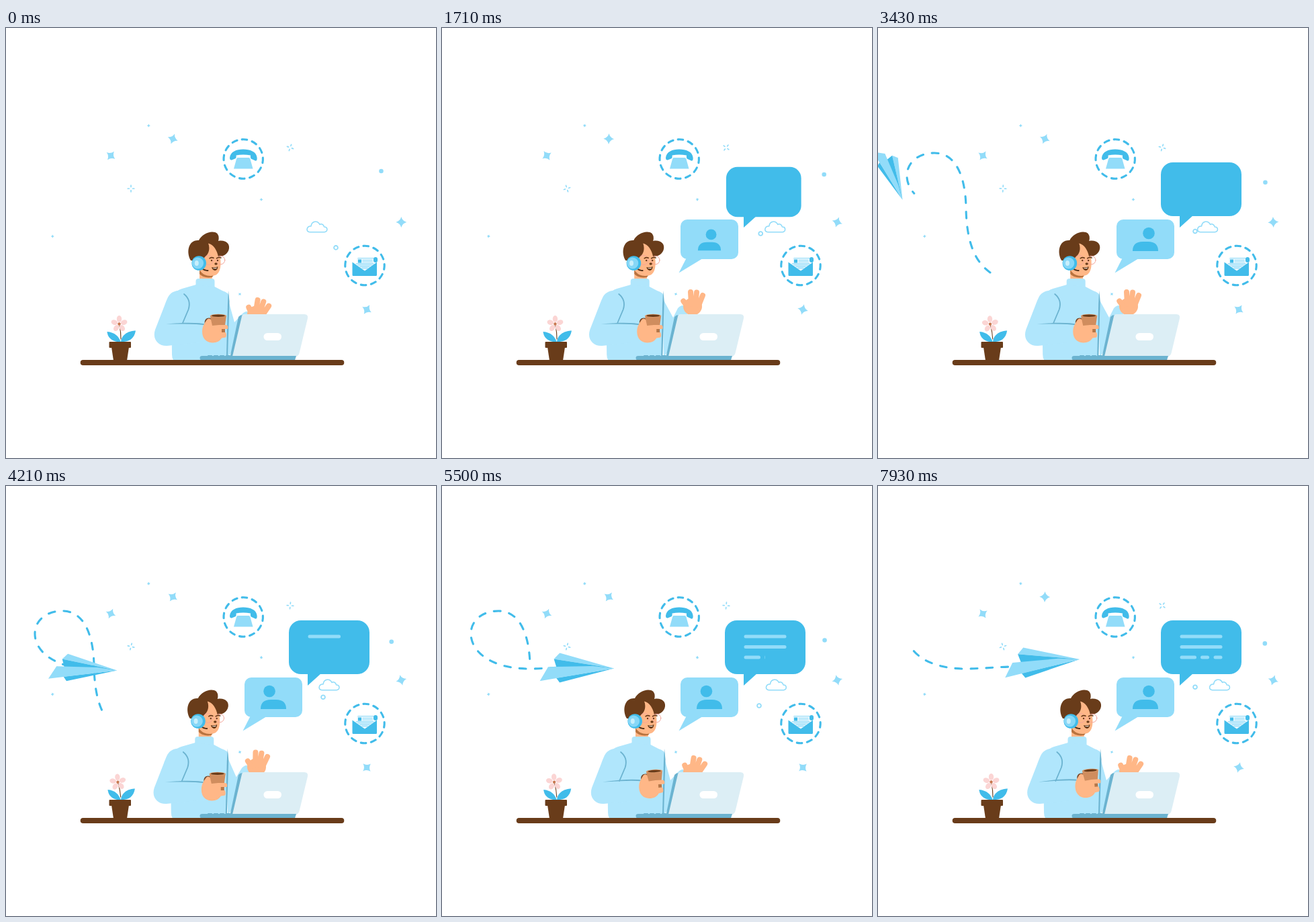
An HTML page that plays this animation: 640 px wide and 640 px high, repeating every 8000 ms.

```html
<!DOCTYPE html>
<html lang="en">
<head>
<meta charset="utf-8">
<title>Customer support</title>
<style>
html, body { margin: 0; height: 100%; overflow: hidden; background: #fff; }
svg { display: block; width: 100vw; height: 100vh; }
.blue { fill: #41bcea; }
.light { fill: #92dcf9; }
.brown { fill: #693c1a; }
.skin { fill: #ffb787; }
.cloth { fill: #b0e6fc; }
.shade { fill: #6bb3d0; }
.line { fill: none; stroke-linecap: round; stroke-linejoin: round; }
.dashed { fill: none; stroke: #41bcea; stroke-width: 3.1; stroke-linecap: round; }
.badge { stroke-dasharray: 7.6 7.7; }
</style>
</head>
<body>
<svg viewBox="0 0 640 640">
  <g id="sparkles"></g>
  <circle id="dot" class="light" r="3.3"/>
  <circle id="ring" class="line" r="2.9" stroke="#92dcf9" stroke-width="1.8"/>

  <!-- phone -->
  <circle class="dashed badge" cx="353.2" cy="195" r="29.2" transform="rotate(-94 353.2 195)"/>
  <path class="light" d="M345 193H361Q363 193 363.5 195L367.5 209.5H339L343 195Q343.5 193 345 193Z"/>
  <path class="blue" d="M333 193C334 184 343 180.5 353 180.5S373 184 373.6 193Q374 198.5 371 197.5L364.5 194.5Q363.5 192 364 189.5Q353 187.5 342.6 189.5Q343 192 342 194L336 196.5Q333 197 333 193Z"/>

  <!-- mail -->
  <circle class="dashed badge" cx="534" cy="353.5" r="29.2" transform="rotate(-94 534 353.5)"/>
  <path fill="#e6f6fd" d="M522.5 342.5H547V353L534 361.5L522.5 353Z"/>
  <path class="line" stroke="#92dcf9" stroke-width="1.2" d="M524 342.5H547M531 345.5H545M531 348H545M521 350.8H547M524 353H544M527 355.2H541M530 357.4H538"/>
  <rect class="blue" x="524" y="344.5" width="5" height="5"/>
  <rect class="blue" x="547" y="341" width="6" height="8" rx="3"/>
  <path class="blue" d="M515.5 348.5L534 361.5L552 348.5V367.5Q552 369 550.5 369H517Q515.5 369 515.5 367.5Z"/>

  <!-- paper plane, its trail and its route -->
  <path id="trail" class="dashed" d="M167 364C140 345 132 310 131 270C131 235 122 186 84 186C60 186 43 200 43 220C43 245 71 272 130 272C155 272 180 269 200 269"/>
  <path id="route" fill="none" d="M167 364C140 345 131 310 131 270C131 235 115 182 75 182C30 182 8 186 22 218C32 241 70 269.6 111 271C150 272.4 200 270 252 270"/>
  <g id="plane">
    <path class="light" d="M56 2L-26 -23L-35 -14Z"/>
    <path class="blue" d="M56 2L-35 -14L-31 0Z"/>
    <path class="blue" d="M56 2L-32 15L-27 22Z"/>
    <path class="light" d="M56 2L24 -2L-44 -2L-57 19Z"/>
  </g>

  <!-- flower pot -->
  <g id="flower">
    <path class="line" stroke="#693c1a" stroke-width="1.1" d="M171 463Q171 452 169 443"/>
    <g id="petals" fill="#fbd5d4"></g>
    <circle cx="168.5" cy="440.5" r="2.2" fill="#c9774f"/>
  </g>
  <path id="leaves" class="blue" d="M171 467.5C155 467 151 458 150.5 452C162 453 168 459 171 467.5C172 455 184 450.5 193 450.5C191 462 184 467 171 467.5Z"/>
  <rect class="brown" x="153.5" y="467" width="32.5" height="9" rx="1"/>
  <path class="brown" d="M157 475H183L180 495H160Z"/>

  <!-- waving arm -->
  <path id="sleeve" class="cloth"/>
  <g id="hand" class="skin">
    <ellipse cx="373" cy="414.5" rx="14" ry="13"/>
    <path class="line" stroke="#ffb787" stroke-width="8" d="M371 411L370 393M377 411L379 393.5M382 413L388 398M365 414L359.3 406.5"/>
  </g>

  <g id="man">
    <!-- head -->
    <path class="skin" d="M300 318C311 320 317 332 319 343C321 358 317 368.5 308 368.5Q306.5 369 306.5 378H288V356L294 338Z"/>
    <path fill="#b9733f" d="M288 360C293 368 301 370 309 368.5L306.5 371C298 372.5 292 370 288 366Z"/>
    <path class="brown" d="M275 346C268 334 271 315 287 316C292 306 307 300 314.5 306Q318 311 316 317C327 315 333 321 332 328C331 337 321 341 316 340.5C314 331 309 322 301 320.5C304 328 302 336 297 340L292 347Z"/>
    <g class="line" stroke="#f4a79b">
      <circle cx="301.5" cy="345.5" r="7"/><circle cx="319.5" cy="345.5" r="6.3"/>
    </g>
    <path class="line" stroke="#693c1a" stroke-width="1.6" d="M303 342.8Q306 340.8 309 342.3M313.5 342.8Q317 340.8 320 342"/>
    <circle class="brown" cx="306" cy="346" r="1.2"/>
    <circle class="brown" cx="315" cy="346" r="1.2"/>
    <ellipse class="brown" cx="312.5" cy="351" rx="2.2" ry="1.8"/>
    <path class="brown" d="M306 356Q311 357 315.5 355Q315 361 310.5 361Q307 360 306 356Z"/>
    <path fill="#fff" d="M308 357Q311 357.5 314 356.5L313 358H309Z"/>
    <path class="line" stroke="#4b2b14" stroke-width="1.8" d="M292 358Q296 361.5 300.5 361"/>
    <circle class="blue" cx="287.2" cy="350" r="10.8"/>
    <circle cx="285.5" cy="350" r="8.6" fill="#86d7f7"/>
    <ellipse cx="283.8" cy="350" rx="3" ry="4" fill="#c8effc"/>

    <!-- sweater -->
    <rect class="cloth" x="282.5" y="373" width="28" height="20" rx="4"/>
    <path class="cloth" d="M283 382L262 388Q247 393 246 410L247 486Q247 491 249 494H330L332 400Q332 394 322 391L310.5 385Z"/>
    <path class="shade" d="M331 391L332.5 407L330 489H328L330 410Z"/>

    <!-- cup arm -->
    <g id="cupArm">
      <path class="cloth" d="M264 390C242 391 242 399 236 413L222 449C217 464 228 474 240 473L298 467L297 441L262 440L271 420L270 398Z"/>
      <path class="line" stroke="#6bb3d0" stroke-width="1.8" d="M265 396Q276 405 271.5 419L263 439"/>
      <g id="cup">
        <path class="shade" d="M238 440.5L265 438.8Q288 438.3 299 441L298 442.5Q285 440.5 265 440.5Z"/>
        <path class="line" stroke="#75472a" stroke-width="2.6" d="M304 433C297 432 296 437 297.5 442"/>
        <path fill="#d08d5e" d="M304 428L306 450H325L328 428Z"/>
        <ellipse cx="316" cy="428.3" rx="12" ry="2.6" fill="#d99a6c"/>
        <ellipse class="brown" cx="316" cy="428.3" rx="10" ry="1.7"/>
        <rect x="320" y="448" width="6" height="6" fill="#b57648"/>
        <path class="skin" d="M292 452C292 442 297 438 299 434Q302 431 305 434L307 443L317 442H328Q331.5 443 330 448H321V453H327Q329 458 327 460.5L321 461.5C317 469 305 470.5 298 465.5Q292 461 292 452Z"/>
      </g>
    </g>
  </g>

  <!-- laptop and desk -->
  <path class="shade" d="M349 427.5H353L339 489H333.5L346 430Z"/>
  <path fill="#dceef5" d="M354 426H444Q450 426 449 432L436.5 484Q435 489 430 489H337L351 429Q352 426 354 426Z"/>
  <rect x="383.5" y="454" width="26.5" height="11" rx="5.5" fill="#fff"/>
  <path class="shade" d="M292 488H432L430 494.5H291Q288.5 494 288.5 491T292 488Z"/>
  <path class="line" stroke="#6bb3d0" stroke-width="2" stroke-dasharray="5 4" d="M301 488H334"/>
  <path class="line" stroke="#693c1a" stroke-width="8" d="M114.7 498H499.3"/>

  <!-- speech bubbles -->
  <g id="smallBubble">
    <path class="light" d="M365 340L352.5 364.5L388 343Z"/>
    <rect class="light" x="355" y="285" width="86" height="59" rx="10"/>
    <g id="person" class="blue">
      <circle id="personHead" cy="305.5" r="8.8"/>
      <path d="M379 332Q379 318 394 318H402Q417 318 417 332Z"/>
    </g>
  </g>
  <g id="bigBubble">
    <path class="blue" d="M449 278V297L469 279Z"/>
    <rect class="blue" x="421" y="200" width="120" height="80" rx="18"/>
    <g id="lines" class="light"></g>
  </g>
  <path id="cloud" class="line" stroke="#92dcf9" stroke-width="1.6" d="M-11 7.7H11C16 7.7 16.5 0 10.5 0C10 -4 6 -5 4 -3.5C1 -10 -8 -9 -9 -1C-16 -1.5 -17 7.7 -11 7.7Z"/>
</svg>
<script>
const LOOP = 8000, TAKEOFF = 2400, TRAIL_FADE = 3430;
const $ = id => document.getElementById(id);

function add(parent, tag, attrs) {
  const el = document.createElementNS('http://www.w3.org/2000/svg', tag);
  for (const name in attrs) el.setAttribute(name, attrs[name]);
  return parent.appendChild(el);
}
const place = (el, transform) => el.setAttribute('transform', transform);
const scaleAt = (x, y, sx, sy = sx) => `translate(${x} ${y}) scale(${sx} ${sy}) translate(${-x} ${-y})`;

const clamp = (v, low, high) => Math.min(high, Math.max(low, v));
const ramp = (t, from, to) => clamp((t - from) / (to - from), 0, 1);
const easeOut = (t, from, to) => 1 - (1 - ramp(t, from, to)) ** 2;
const smooth = (t, from, to) => { const u = ramp(t, from, to); return u * u * (3 - 2 * u); };
const bump = (t, peak, reach) => smooth(t, peak - reach, peak) - smooth(t, peak, peak + reach);
const cycle = (t, peak, period) => Math.cos((t - peak) / period * 2 * Math.PI);
const settle = (t, slowness) => 1 - Math.exp(-Math.max(0, t - TAKEOFF) / slowness);

// Four-point stars and four-stroke bursts, each swinging on its spot.
const STAR = 'M0-8Q1.7-1.7 8 0Q1.7 1.7 0 8Q-1.7 1.7-8 0Q-1.7-1.7 0-8Z';
const BURST = 'M0-2.6V-4.8M0 2.6V4.8M-2.6 0H-4.8M2.6 0H4.8';
const starStyle = { d: STAR, class: 'light' };
const burstStyle = { d: BURST, class: 'line', stroke: '#92dcf9', 'stroke-width': 1.7 };

function sparkle(style, size, spots) {
  return spots.map(([x, y, tilt], i) =>
    ({ x, y, tilt, size, swing: i % 2 ? -18 : 18, el: add($('sparkles'), 'path', style) }));
}
const sparkles = [
  ...sparkle(starStyle, 1, [[156, 190, 38], [248.3, 165, 20], [588.3, 289, 0], [537, 419, 32]]),
  ...sparkle(starStyle, .32, [[212.3, 145.3, 0], [380, 255.3, 0], [69.3, 310, 0], [348, 396, 45]]),
  ...sparkle(burstStyle, 1, [[423, 178, 20], [186, 239, 0]])
];

for (let i = 0; i < 5; i++) {
  add($('petals'), 'ellipse', { cx: 168.5, cy: 433, rx: 3.7, ry: 4.9, transform: `rotate(${i * 72} 168.5 440.5)` });
}

// Text bars, written one after another.
let written = 0;
const bars = [[449.5, 0, 63], [449.5, 1, 63], [449.5, 2, 24.5], [480, 2, 13], [499.5, 2, 13]]
  .map(([x, row, width]) => {
    const el = add($('lines'), 'rect', { x, y: 221.5 + row * 15.5, height: 5, rx: 2.5 });
    const start = written;
    written += width;
    return { width, start, el };
  });

// Dashes are counted from the moving tail of the trail.
function drawTrail(t) {
  const faded = Math.max(0, t - TRAIL_FADE) / 1000;
  const from = 48 * faded + 4.1 * faded ** 2, to = 450 * settle(t, 940);
  const dash = 9.8, period = 22.8, pattern = [];
  for (let at = from; at < to; at += period) {
    pattern.push(Math.min(dash, to - at), at + period < to ? period - dash : 999);
  }
  $('trail').style.display = pattern.length ? '' : 'none';
  $('trail').setAttribute('stroke-dasharray', pattern.join(' '));
  $('trail').setAttribute('stroke-dashoffset', -from);
}

const route = $('route'), routeLength = route.getTotalLength();
function drawPlane(t) {
  const at = routeLength * settle(t, 1300);
  const spot = route.getPointAtLength(at);
  const back = route.getPointAtLength(at - 1), ahead = route.getPointAtLength(at + 1);
  const heading = Math.atan2(ahead.y - back.y, ahead.x - back.x) * 180 / Math.PI;
  const climb = smooth(t, 5400, 7600);
  place($('plane'), `translate(${spot.x} ${spot.y - 9 * climb}) rotate(${heading - 5 * climb}) scale(${settle(t, 780)})`);
}

function drawMan(t) {
  const wave = smooth(t, 200, 1500) - smooth(t, 3800, 4900), down = 1 - wave;
  const lift = bump(t, 6790, 2150);
  const elbow = `${344 - 4 * down} ${431 + 7 * down}`, drop = 9 * down;
  $('sleeve').setAttribute('d', `M328 402L332 409L${elbow}L351 ${417 + drop}Q357 ${411 + drop} 361 ${414 + drop}L368 434L345 470L330 490Z`);
  place($('hand'), `translate(0 ${12 * down}) rotate(${12.5 * down} 373 414)`);
  place($('man'), `translate(${-1.8 * wave} 0)`);
  place($('cupArm'), `translate(${3 * lift} 0)`);
  place($('cup'), `rotate(${-8 * lift} 238 448)`);
}

function drawBubbles(t) {
  place($('smallBubble'), scaleAt(353, 364, easeOut(t, 900, 1350)));
  place($('person'), scaleAt(398, 325, easeOut(t, 1300, 1900)));
  $('personHead').setAttribute('cx', 397.5 + 5.5 * cycle(t, 3430, 1500));
  place($('bigBubble'), scaleAt(449, 297, easeOut(t, 1350, 1840)));
  const ink = (t - 3600) * .0795;
  for (const bar of bars) bar.el.setAttribute('width', clamp(ink - bar.start, 0, bar.width));
}

function drawDrifters(t) {
  for (const s of sparkles) {
    place(s.el, `translate(${s.x} ${s.y}) rotate(${s.tilt + s.swing * cycle(t, 1625, 6500)}) scale(${s.size})`);
  }
  const arrival = 1 - easeOut(t, 0, 2600);
  place($('dot'), `translate(${573 + 3.5 * cycle(t, 3300, 4200) - 15.3 * arrival} ${213 + .0027 * t + 8 * bump(t, 3800, 2400)})`);
  place($('ring'), `translate(${472 + 19 * arrival} ${312.5 + 14.5 * cycle(t, 5500, 5600)})`);
  place($('cloud'), `translate(${478 + .004 * t - 15 * cycle(t, 0, 4500)} 296)`);
  const sway = bump(t, 4400, 3000);
  place($('flower'), `rotate(${-4.5 * sway} 171 467)`);
  place($('leaves'), scaleAt(171, 467, 1 - .05 * sway, 1));
}

function tick() {
  const t = performance.now() % LOOP;
  drawDrifters(t);
  drawTrail(t);
  drawPlane(t);
  drawMan(t);
  drawBubbles(t);
  requestAnimationFrame(tick);
}
tick();
</script>
</body>
</html>
```
